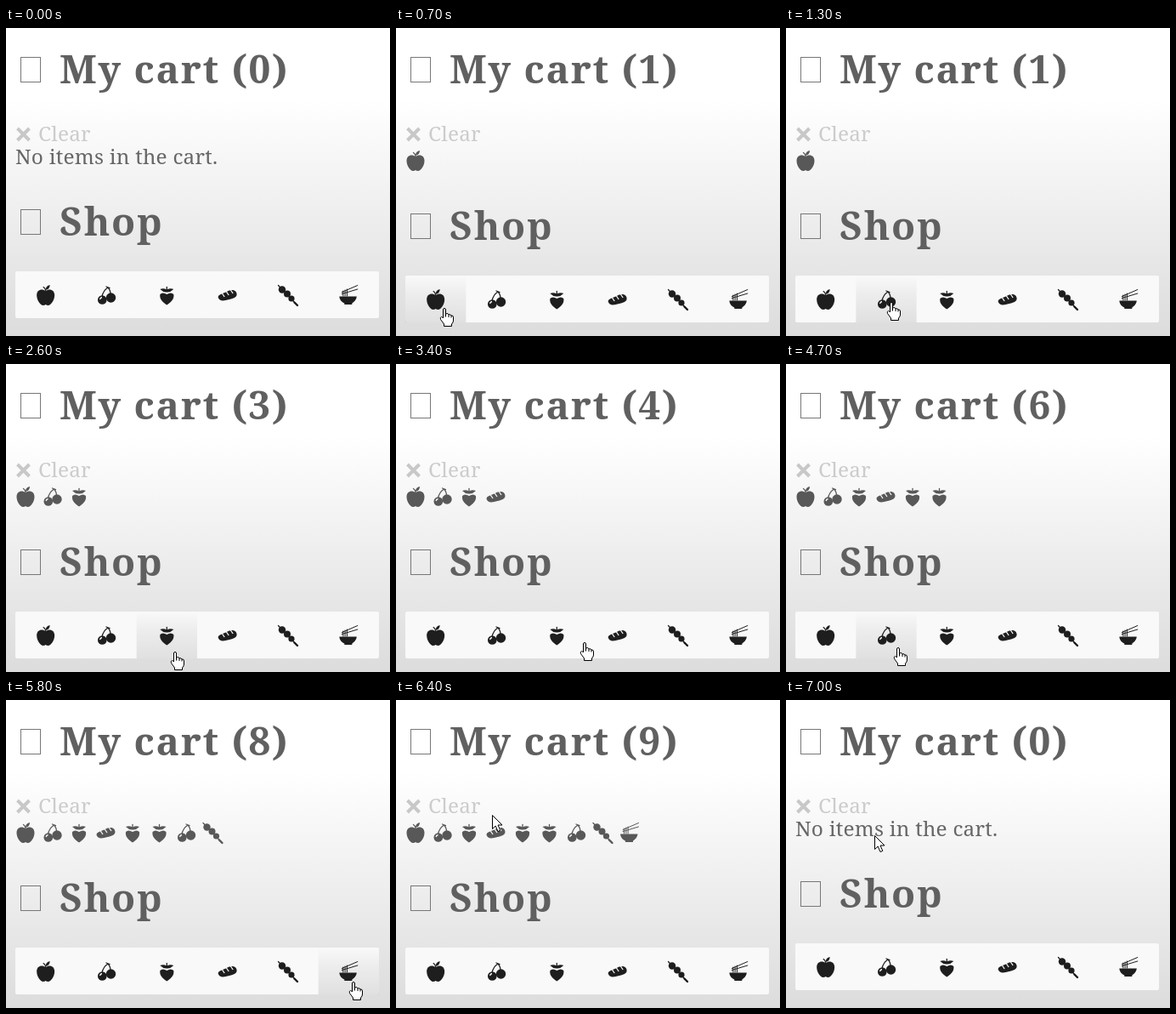
An HTML page for the animation above (7200 ms loop, 452 by 362 pixels).

```html
<!DOCTYPE html>
<html lang="en">
<head>
<meta charset="utf-8">
<title>Cart</title>
<style>
  html, body { margin: 0; width: 100%; height: 100%; overflow: hidden; }
  svg { display: block; width: 452px; height: 362px; }
  text { font: 24.4px "Noto Serif", "Liberation Serif", serif; letter-spacing: .2px; fill: #666; }
  .title { font-size: 46px; font-weight: 700; letter-spacing: 1.7px; fill: #606060; }
  .tofu { fill: none; stroke: #777; }
  .icon { fill: currentColor; }
  .line { fill: none; stroke: currentColor; stroke-width: 1.3; stroke-linecap: round; }
  .gap { fill: none; stroke: #f6f6f6; stroke-width: 1.3; }
  .pointer { fill: #fff; stroke: #000; stroke-linejoin: round; }
</style>
</head>
<body>
<svg viewBox="0 0 452 362">
  <defs>
    <linearGradient id="page" gradientUnits="userSpaceOnUse" x1="0" y1="85" x2="0" y2="362">
      <stop stop-color="#fff"/><stop offset="1" stop-color="#dcdcdc"/>
    </linearGradient>
    <linearGradient id="shade" x1="0" y1="0" x2="0" y2="1">
      <stop stop-opacity="0"/><stop offset=".4" stop-opacity=".05"/><stop offset="1" stop-opacity=".1"/>
    </linearGradient>
    <g id="apple" class="icon">
      <path d="M0-5C-4-8-10.500-7-10.500 0C-10.500 6-6 12-3 12Q-1 12 0 11Q1 12 3 12C6 12 10.500 6 10.500 0C10.500-7 4-8 0-5Z"/>
      <path d="M0-6Q0-11 5-12Q5-7 0-6Z"/>
      <path class="line" d="M0-5Q0-8-2.500-9.500"/>
    </g>
    <g id="cherry" class="icon">
      <circle cx="-4.700" cy="5.500" r="5.300"/><circle cx="5.500" cy="3" r="5.700"/>
      <path class="line" d="M-5 2Q-4-5 2-9Q5-6 5-1M0-10L4-8.500"/>
      <path class="gap" d="M-7.500 5Q-7 3-5 2.500"/>
    </g>
    <g id="berry" class="icon">
      <path d="M-8-1Q-5-4 0-1Q5-4 8-1C9 5 4 9 0 11.500C-4 9-9 5-8-1Z"/>
      <path d="M-8-7Q-4-8.500 0-6.500Q4-8.500 8-7Q4-3 0-3.500Q-4-3-8-7Z"/>
      <path class="line" d="M0-6V-9.500"/>
    </g>
    <g id="bread" class="icon">
      <path d="M-11 2.500C-11-1-5-2 0-4.500C5-7.500 11-6 11-1C11 4 3 4.500-2 6C-6 7-10 6.500-11 2.500Z"/>
      <path class="gap" d="M-6.500-2.500L-3.500 2M-1.500-4.500L1.500 0M3.500-6.500L6.500-2"/>
    </g>
    <g id="skewer" class="icon">
      <path class="line" d="M-11.500-11.500L11 12"/>
      <path class="line" style="stroke-width:2.400" d="M7.500 8.500L11 12"/>
      <circle cx="-7" cy="-6.500" r="4.200"/><circle cx="-1" cy="-1.500" r="4"/><circle cx="4" cy="4" r="3.600"/>
    </g>
    <g id="noodles" class="icon">
      <path d="M-11 1.500H9.500C9 6 6 8 4 9.500V11H-5V9.500C-8 8-10.500 6-11 1.500Z"/>
      <path class="line" style="stroke-width:1" d="M-6.500-5V1M-4.200-6V1M-1.900-7V1M-8-3.500L10.500-11.500M-8-1.500L10.500-7"/>
    </g>
    <g id="hand" class="pointer">
      <path d="M-1.500 12V2Q-1.500.5 0 .5T1.500 2V7Q4.500 5.500 5 8Q7.500 7 8 9Q10.500 8.500 10.500 11V15Q10.500 17 8.500 19V21.500H-.5V19L-4.500 13.500Q-5.500 11-3.500 10.500Q-2.500 10.500-1.500 12Z"/>
      <path d="M1.500 7V10.500M5 8V11M8 9V11.500"/>
    </g>
    <path id="arrow" class="pointer" d="M.5.500V16.500L4.200 13L7 19.500L9.800 18.300L7 12H12Z"/>
  </defs>
  <rect width="452" height="362" fill="url(#page)"/>
  <rect class="tofu" x="17.500" y="34.500" width="23" height="29"/>
  <text class="title" x="63" y="65" id="title"></text>
  <path d="M13.500 118L27.500 132M27.500 118L13.500 132" stroke="#c8c8c8" stroke-width="4"/>
  <text x="38" y="133" style="fill:#ccc">Clear</text>
  <text x="11" y="160" id="empty">No items in the cart.</text>
  <g id="cart" color="#585858"></g>
  <g id="shop" color="#1e1e1e">
    <rect class="tofu" x="17.500" y="213.500" width="23" height="29"/>
    <text class="title" x="63" y="244">Shop</text>
    <rect x="11" y="286" width="428" height="55" rx="2" fill="#f9f9f9"/>
    <rect id="hover" y="286" width="71.330" height="55" fill="url(#shade)"/>
  </g>
  <use id="cursor"/>
</svg>
<script>
const LOOP = 7200, STEP = 100;
const LEFT = 11, CELL = 428 / 6;
const LEAD = 200, TRAVEL = 400;
const goods = ["apple", "cherry", "berry", "bread", "skewer", "noodles"];

// The shopping trip: when the pointer enters each button and clicks it.
const visits = [
  { item: "apple", at: 300, clicks: [500] },
  { item: "cherry", at: 1300, clicks: [1600] },
  { item: "berry", at: 2000, clicks: [2300] },
  { item: "bread", at: 2800, clicks: [3100] },
  { item: "berry", at: 3500, clicks: [3900, 4200] },
  { item: "cherry", at: 4700, clicks: [5000] },
  { item: "skewer", at: 5200, clicks: [5400] },
  { item: "noodles", at: 5800, clicks: [6200] },
];
const clearAt = 6600;
const orders = visits.flatMap(({ item, clicks }) => clicks.map(time => ({ item, time })));

const el = id => document.getElementById(id);
const show = (node, on) => { node.style.display = on ? "" : "none"; };
const icon = (name, x, y) => `<use href="#${name}" x="${x}" y="${y}"/>`;
const cellX = item => LEFT + CELL * goods.indexOf(item);
const easeOut = k => 1 - (1 - k) ** 4;

// The hand sways slowly up and down while it is over the row.
const swayY = t => 330 - 8 * Math.cos(2 * Math.PI * (t - 1300) / 2600);

const entry = { at: 100 - TRAVEL + LEAD, x: 288, y: () => 34 };
const stops = [
  entry,
  ...visits.map(({ item, at }) => ({ item, at, x: cellX(item) + CELL / 2 + 10, y: swayY })),
  { at: 6400, x: 93, y: () => 122 },
  { at: 6800, x: 104, y: () => 159 },
];

function pointerAt(t) {
  const i = stops.findLastIndex(stop => stop.at - LEAD <= t);
  const to = stops[i], from = stops[Math.max(i - 1, 0)];
  const k = easeOut(Math.min((t - to.at + LEAD) / TRAVEL, 1));
  const mix = (a, b) => Math.round(a + (b - a) * k);
  return { x: mix(from.x, to.x), y: mix(from.y(t), to.y(t)) };
}

// A button lights up once entered, until the pointer is off it.
function hoveredItem(t, { x, y }) {
  const { item } = stops.findLast(stop => stop.at <= t) || entry;
  const inside = x >= cellX(item) && x < cellX(item) + CELL && y > 286;
  return item && inside ? item : null;
}

function draw(time) {
  const t = Math.floor((time % LOOP) / STEP) * STEP;
  const count = t < clearAt ? orders.filter(order => order.time <= t).length : 0;
  el("title").textContent = `My cart (${count})`;
  show(el("empty"), !count);
  [...el("cart").children].forEach((node, i) => show(node, i < count));
  el("shop").setAttribute("transform", `translate(0 ${count ? 5 : 0})`);

  const pointer = t >= 100 ? pointerAt(t) : entry;
  const item = hoveredItem(t, pointer);
  show(el("hover"), item);
  if (item) el("hover").setAttribute("x", cellX(item));

  const { x, y } = pointer;
  const onLink = y > 286 || (x < 100 && y > 110 && y < 138);
  show(el("cursor"), t >= 100);
  el("cursor").setAttribute("href", onLink ? "#hand" : "#arrow");
  el("cursor").setAttribute("transform", t >= 100 ? `translate(${x} ${y})` : "");
}

el("shop").insertAdjacentHTML("beforeend",
  goods.map(name => icon(name, cellX(name) + CELL / 2, 314)).join(""));
el("cart").innerHTML =
  orders.map(({ item }, i) => icon(item, 23 + 31.5 * i, 156)).join("");

const start = performance.now();
function tick() {
  draw(performance.now() - start);
  requestAnimationFrame(tick);
}
tick();
</script>
</body>
</html>
```
